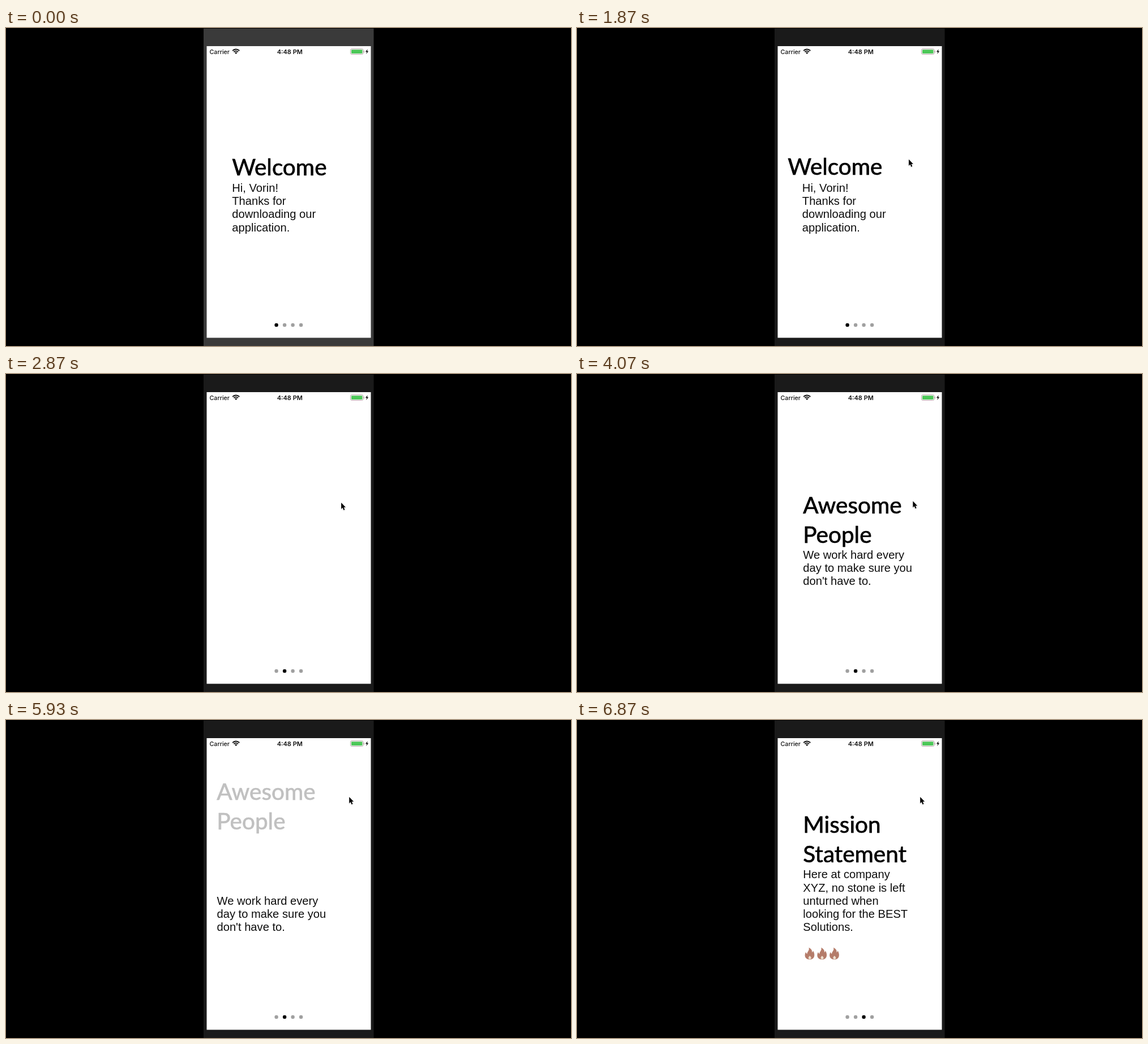
An HTML page with a canvas for the animation above (8 s loop, 998 by 561 pixels).

```html
<!DOCTYPE html>
<html lang="en">
<head>
<meta charset="utf-8">
<title>Onboarding</title>
<style>
html, body { margin: 0; width: 100%; height: 100%; overflow: hidden; background: #000; }
canvas { display: block; width: 998px; height: 561px; }
</style>
</head>
<body>
<canvas id="stage" width="998" height="561"></canvas>
<script>
const ctx = document.getElementById('stage').getContext('2d');
const LOOP = 8000;
const SCREEN = { x: 354.5, y: 32, w: 290, h: 514.5 };
const TEXT_X = 399.3, NUDGE = -27, TITLE_RISE = -139, BODY_RISE = -309;
const STEP = 500, SLIDE = 220;
const TITLE_FONT = '400 40.5px Lato, sans-serif';
const BODY_FONT = '20.17px "Liberation Sans", Arial, sans-serif';

// tap: title nudges left; lift: title rises while the body nudges
const pages = [
  { title: ['Welcome'], titleY: 259.5, bodyY: 289, tap: 1395, lift: 1858,
    body: ['Hi, Vorin!', 'Thanks for', 'downloading our', 'application.'] },
  { title: ['Awesome', 'People'], titleY: 246, bodyY: 326, tap: 5098, lift: 5597,
    body: ['We work hard every', 'day to make sure you', "don't have to."] },
  { title: ['Mission', 'Statement'], titleY: 199, bodyY: 279.3, tap: Infinity, lift: Infinity, flames: true,
    body: ['Here at company', 'XYZ, no stone is left', 'unturned when', 'looking for the BEST', 'Solutions.'] }
];

// pointer legs: start, end, from x, y, to x, y
const legs = [
  [270, 1000, 412, 492, 552, 157],
  [1190, 1340, 552, 157, 605, 112],
  [1480, 2080, 605, 112, 578, 275],
  [2480, 2930, 578, 275, 592, 224],
  [4050, 4130, 592, 224, 596, 220.5],
  [4250, 4470, 596, 220.5, 605.5, 135]
];

const clamp = v => Math.min(1, Math.max(0, v));
const lerp = (a, b, p) => a + (b - a) * p;
const ease = p => 0.5 - Math.cos(Math.PI * clamp(p)) / 2;

function spring(ms) {
  if (ms <= 0) return 0;
  const w = 27, damping = 0.5, wd = w * Math.sqrt(1 - damping * damping), t = ms / 1000;
  return 1 - Math.exp(-damping * w * t) * (Math.cos(wd * t) + damping * w / wd * Math.sin(wd * t));
}

function shade(alpha, base) {
  const v = Math.round(lerp(255, base, alpha));
  return `rgb(${v},${v},${v})`;
}

function shape(points, fill) {
  ctx.beginPath();
  points.forEach(([x, y]) => ctx.lineTo(x, y));
  ctx.closePath();
  ctx.fillStyle = fill;
  ctx.fill();
}

function dot(x, y, r, fill) {
  ctx.beginPath();
  ctx.arc(x, y, r, 0, Math.PI * 2);
  ctx.fillStyle = fill;
  ctx.fill();
}

function pill(x, y, w, h, r) {
  ctx.beginPath();
  ctx.roundRect(x, y, w, h, r);
}

function lines(list, x, y, gap, font, color, outline) {
  ctx.font = font;
  ctx.fillStyle = ctx.strokeStyle = color;
  ctx.lineWidth = outline;
  ctx.lineJoin = 'round';
  list.forEach((line, i) => {
    ctx.fillText(line, x, y + i * gap);
    if (outline) ctx.strokeText(line, x, y + i * gap);
  });
}

function flame(x, y) {
  ctx.save();
  ctx.translate(x, y);
  ctx.beginPath();
  ctx.moveTo(7.5, 0);
  ctx.bezierCurveTo(13, 3, 13.5, 6, 13, 8.5);
  ctx.quadraticCurveTo(15, 7.5, 14.8, 5.5);
  ctx.bezierCurveTo(19, 11, 18.5, 21, 9.5, 21);
  ctx.bezierCurveTo(0, 21, -1, 13, 2.2, 8);
  ctx.quadraticCurveTo(3, 10.5, 4.5, 11);
  ctx.bezierCurveTo(4.5, 7, 9, 5.5, 7.5, 0);
  ctx.fillStyle = '#b57c6a';
  ctx.fill();
  ctx.beginPath();
  ctx.moveTo(9, 14.5);
  ctx.bezierCurveTo(13, 17, 12, 20.5, 9.5, 20.5);
  ctx.bezierCurveTo(6, 20.5, 6, 17, 9, 14.5);
  ctx.fillStyle = '#eee0cf';
  ctx.fill();
  ctx.restore();
}

function drawPage(page, t, dx) {
  const rise = ease((t - page.lift) / STEP);
  const bodyRise = ease((t - page.lift - STEP) / STEP);
  const x = TEXT_X + dx;
  if (rise < 1) {
    lines(page.title, x + NUDGE * spring(t - page.tap), page.titleY + TITLE_RISE * rise,
      51.5, TITLE_FONT, shade(1 - rise, 0), 0.7);
  }
  if (bodyRise < 1) {
    lines(page.body, x + NUDGE * spring(t - page.lift), page.bodyY + BODY_RISE * bodyRise,
      23.2, BODY_FONT, shade(1 - bodyRise, 14), 0);
  }
  if (page.flames) for (let i = 0; i < 3; i++) flame(402 + dx + i * 21.8, 401.5);
}

function statusBar() {
  ctx.fillStyle = '#111';
  ctx.font = '500 10.7px Inter, sans-serif';
  ctx.fillText('Carrier', 359.5, 45.5);
  ctx.font = '600 11px Inter, sans-serif';
  ctx.textAlign = 'center';
  ctx.fillText('4:48 PM', 501.3, 45.5);
  ctx.textAlign = 'left';

  ctx.strokeStyle = '#111';
  ctx.lineWidth = 1.9;
  for (const r of [8.3, 5.2]) {
    ctx.beginPath();
    ctx.arc(406.2, 45.8, r, -Math.PI * 0.76, -Math.PI * 0.24);
    ctx.stroke();
  }
  shape([[406.2, 46], [403.9, 43.6], [405.2, 42.8], [407.2, 42.8], [408.5, 43.6]], '#111');

  pill(608.5, 36.8, 22.5, 9.6, 2.4);
  ctx.strokeStyle = '#b3a3a3';
  ctx.lineWidth = 1;
  ctx.stroke();
  pill(610, 38.2, 19.5, 6.8, 1.2);
  ctx.fillStyle = '#4cc758';
  ctx.fill();
  pill(631.7, 40, 1.2, 3.4, 0.6);
  ctx.fillStyle = '#b3a3a3';
  ctx.fill();
  shape([[638.6, 37.2], [635, 42.1], [637.2, 42.1], [636.3, 46], [640.2, 40.8], [638, 40.8]], '#111');
}

function pointer(t) {
  const leg = legs.filter(l => l[0] <= t).pop();
  if (!leg) return;
  const [start, end, x0, y0, x1, y1] = leg;
  const p = ease((t - start) / (end - start));
  ctx.save();
  ctx.translate(lerp(x0, x1, p), lerp(y0, y1, p));
  const arrow = [[0.7, 0.8], [0.7, 12], [3.2, 9.7], [5, 14], [7, 13.1], [5.2, 9], [8.6, 9]];
  ctx.shadowColor = 'rgba(0,0,0,.35)';
  ctx.shadowBlur = 2;
  ctx.shadowOffsetY = 1;
  shape(arrow, '#000');
  ctx.shadowColor = 'transparent';
  ctx.strokeStyle = '#fff';
  ctx.lineWidth = 1.6;
  ctx.stroke();
  shape(arrow, '#000');
  ctx.restore();
}

function draw(t) {
  ctx.fillStyle = '#000';
  ctx.fillRect(0, 0, 998, 561);
  ctx.fillStyle = t < 1270 ? '#3a3a3a' : '#1a1a1a';
  ctx.fillRect(349, 1, 300.5, 560);
  ctx.fillStyle = '#fff';
  ctx.fillRect(SCREEN.x, SCREEN.y, SCREEN.w, SCREEN.h);

  ctx.save();
  ctx.beginPath();
  ctx.rect(SCREEN.x, SCREEN.y, SCREEN.w, SCREEN.h);
  ctx.clip();
  const turns = pages.map(p => p.lift + 2 * STEP);
  const current = turns.filter(turn => t >= turn).length;
  const slide = current ? ease((t - turns[current - 1]) / SLIDE) : 1;
  drawPage(pages[current], t, SCREEN.w * (1 - slide));
  statusBar();
  for (let i = 0; i < 4; i++) dot(477.6 + i * 14.5, 524, 3.2, i === current ? '#000' : '#a0a0a0');
  ctx.restore();

  pointer(t);
}

const began = performance.now();
function tick() {
  draw((performance.now() - began) % LOOP);
  requestAnimationFrame(tick);
}
tick();
</script>
</body>
</html>
```
